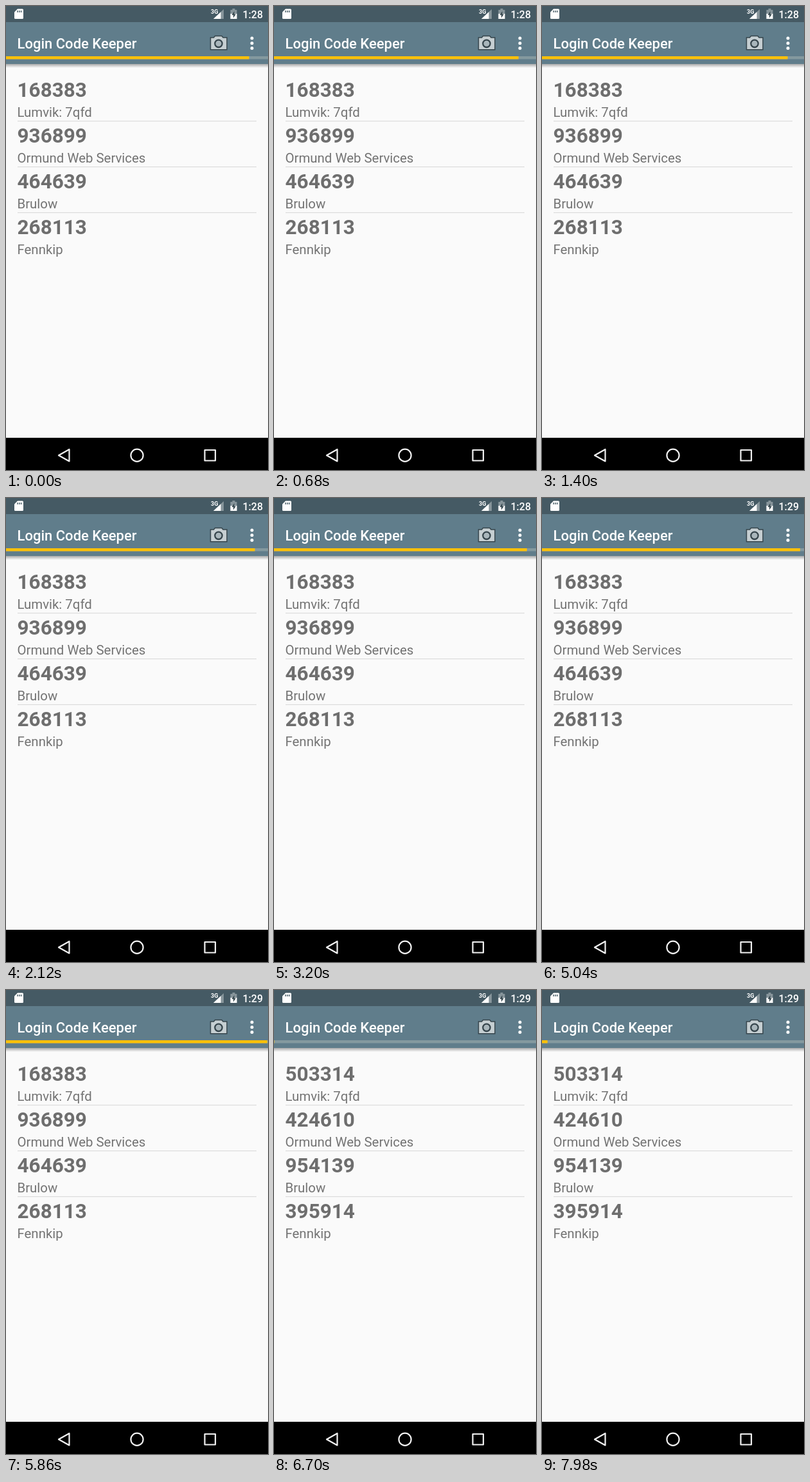
These frames come from a looping animation (408 px wide and 720 px high, 8 s). An HTML page:

```html
<!DOCTYPE html>
<html lang="en">
<head>
<meta charset="utf-8">
<title>Login codes</title>
<style>
  html, body { margin: 0; width: 100%; height: 100%; overflow: hidden; background: #fafafa; }
  svg { display: block; width: 100%; height: 100%; font-family: Roboto, sans-serif; }
  .title { font-size: 22px; font-weight: 500; fill: #fff; }
  .code { font-size: 31.5px; font-weight: 700; fill: #6e6e6e; }
  .label { font-size: 20.4px; fill: #737373; }
  .clock { font-size: 16px; font-weight: 500; fill: #fff; }
</style>
</head>
<body>
<svg viewBox="0 0 408 720">
  <defs>
    <linearGradient id="shade" x2="0" y2="1">
      <stop offset="0" stop-opacity=".32"/>
      <stop offset="1" stop-opacity="0"/>
    </linearGradient>
  </defs>
  <rect width="408" height="720" fill="#fafafa"/>

  <rect width="408" height="26" fill="#455a64"/>
  <rect y="25" width="408" height="65" fill="#607d8b"/>
  <rect y="90" width="408" height="6" fill="url(#shade)"/>
  <rect y="78" width="408" height="4.5" fill="#84999f"/>
  <rect id="bar" y="78" height="4.5" fill="#ffc107"/>

  <g fill="#fff">
    <path d="M18 4.5h7.5q1.5 0 1.5 1.5v12.5q0 1.5-1.5 1.5h-11q-1.5 0-1.5-1.5V9.5z"/>
    <path d="M18 7v3M20.8 7v3M23.6 7v3" stroke="#455a64" stroke-width="1.4"/>
    <text x="319" y="12" font-size="9" font-weight="700">3G</text>
    <path d="M339 5v15h-16z" fill="#87959b"/>
    <path d="M334.5 9.2V20H323z"/>
    <path d="M352.5 4h4v2h3v14h-10V6h3z" fill="#87959b"/>
    <path d="M349.5 12h10v8h-10z"/>
    <path d="M355.5 8l-4 6h2.5v4.5l4-6h-2.5z" fill="#37484f"/>
    <text id="clock" class="clock" x="400" y="19" text-anchor="end"></text>
  </g>

  <text class="title" x="17.5" y="66">Login Code Keeper</text>
  <g stroke="#36454c" stroke-width="1.5" fill="#c6cfd2">
    <path d="M318.5 49h5l2-2.5h10.5l2 2.5h6v18.8h-25.5z"/>
    <circle cx="331" cy="58.3" r="5.7" fill="#a9b6bb" stroke-width="2.3"/>
  </g>
  <g fill="#fff">
    <circle cx="383" cy="50" r="2.5"/>
    <circle cx="383" cy="57.8" r="2.5"/>
    <circle cx="383" cy="65.6" r="2.5"/>
  </g>

  <g id="list"></g>

  <rect y="670" width="408" height="50"/>
  <g fill="none" stroke="#f2f2f2" stroke-width="2.2" stroke-linejoin="round">
    <path d="M98.5 688v18.5L82 697.2z"/>
    <circle cx="204" cy="697.2" r="9.6"/>
    <rect x="309.5" y="689" width="16.5" height="16.5"/>
  </g>
</svg>
<script>
const LOOP = 8000, WIDTH = 408;
const PERIOD = 30;       // seconds a code is valid
const FPS = 60;
const RENEW = 136 / FPS; // seconds until the codes renew
const MINUTE = 83 / FPS; // seconds until the clock turns
const entries = [
  ["Lumvik: 7qfd", "168383", "503314"],
  ["Ormund Web Services", "936899", "424610"],
  ["Brulow", "464639", "954139"],
  ["Fennkip", "268113", "395914"]
];
const byId = id => document.getElementById(id);
const bar = byId("bar"), clock = byId("clock"), list = byId("list");

function add(tag, attrs, text = "") {
  const el = document.createElementNS("http://www.w3.org/2000/svg", tag);
  for (const key in attrs) el.setAttribute(key, attrs[key]);
  el.textContent = text;
  return list.appendChild(el);
}

const codes = entries.map(([name], i) => {
  const y = 71 * i;
  if (i) add("rect", { x: 18, y: 107 + y, width: 372, height: 1.2, fill: "#dcdcdc" });
  add("text", { class: "label", x: 17.5, y: 172 + y }, name);
  return add("text", { class: "code", x: 17.5, y: 141 + y });
});

function setText(el, text) {
  if (el.textContent !== text) el.textContent = text;
}

// Screens are held for 20, 100 and 20 ms in turn.
function screenTime(t) {
  const rest = t % 140;
  return (3 * Math.floor(t / 140) + (rest >= 20) + (rest >= 120)) / FPS;
}

const ease = x => (1 - Math.cos(Math.PI * x)) / 2;

function draw(t) {
  const now = screenTime(t);
  const age = now - RENEW + PERIOD;
  const second = Math.floor(age);
  const progress = second % PERIOD + ease(age - second);
  bar.setAttribute("width", (progress / PERIOD * WIDTH).toFixed(2));
  setText(clock, now < MINUTE ? "1:28" : "1:29");
  codes.forEach((el, i) => setText(el, entries[i][age < PERIOD ? 1 : 2]));
}

const begin = performance.now();
function tick() {
  draw((performance.now() - begin) % LOOP);
  requestAnimationFrame(tick);
}
tick();
</script>
</body>
</html>
```
